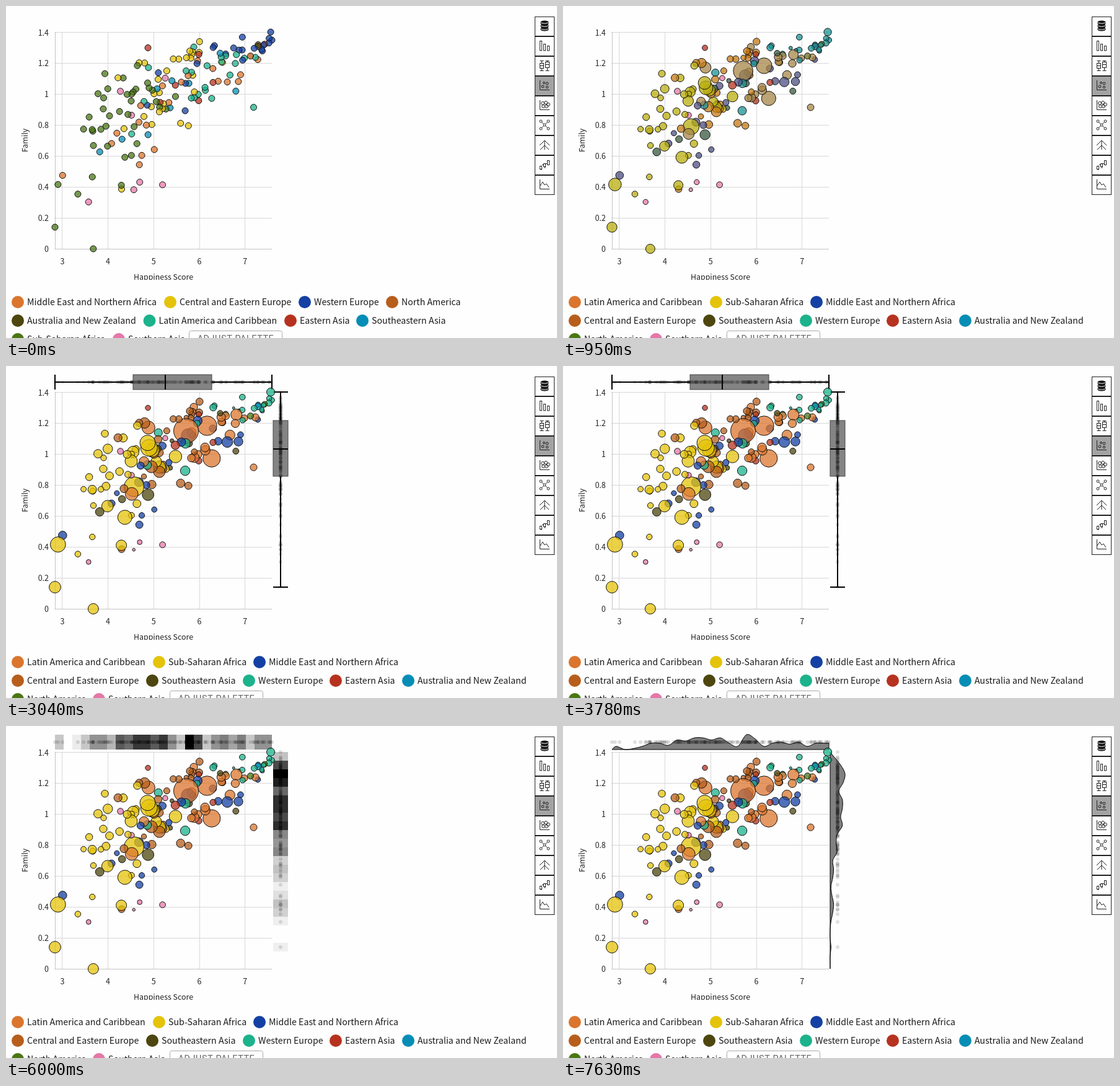
An HTML page with a canvas for the animation above (8000 ms loop, 889 by 536 pixels).

```html
<!DOCTYPE html>
<html lang="en">
<head>
<meta charset="utf-8">
<title>Scatter plot with marginal distributions</title>
<style>
html, body { margin: 0; width: 100%; height: 100%; overflow: hidden; background: #fefefe; }
canvas { display: block; }
</style>
</head>
<body>
<canvas id="stage" width="889" height="536"></canvas>
<script>
const g = document.getElementById('stage').getContext('2d');
const LOOP = 8000;
const SANS = '"Noto Sans CJK SC", "Noto Sans CJK JP", "Noto Sans CJK", "Noto Sans", sans-serif';
const PALETTE = [[219, 117, 46], [228, 195, 10], [20, 64, 164], [183, 94, 27], [77, 70, 14],
  [28, 178, 140], [182, 50, 31], [5, 141, 181], [74, 119, 20], [229, 120, 168]];

// Plot area and scales
const L = 79, R = 429, T = 42, B = 392;
const sx = v => L + (v - 2.839) / 4.748 * (R - L);
const sy = v => B - v / 1.40223 * (B - T);
const sr = v => 2 + (v - 18.5) / 118.4 * 18;

// Each region: palette index before and after, then score, family, error (x 1000)
const dots = [];
function region(from, to, d) {
  for (let i = 0; i < d.length; i += 3) {
    dots.push({ x: sx(d[i]), y: sy(d[i + 1]), r: sr(d[i + 2]), a: PALETTE[from], b: PALETTE[to] });
  }
}
// Western Europe
region(2, 5, [7.587, 1.35, 34.1, 7.561, 1.402, 48.8, 7.527, 1.361, 33.3, 7.522, 1.331, 38.8,
  7.406, 1.318, 31.4, 7.378, 1.28, 28, 7.364, 1.289, 31.6, 7.2, 1.297, 37.5, 6.946, 1.22, 35,
  6.94, 1.369, 36.8, 6.937, 1.286, 36, 6.867, 1.285, 18.7, 6.75, 1.299, 18.5, 6.575, 1.26, 35.1,
  6.329, 1.314, 34.7, 6.302, 1.302, 42.1, 5.948, 1.198, 39.1, 5.695, 1.07, 56.4,
  5.689, 0.893, 55.8, 5.102, 1.139, 48, 4.857, 0.929, 50.6]);
// North America
region(3, 8, [7.427, 1.323, 35.5, 7.119, 1.247, 38.4]);
// Australia and New Zealand
region(4, 7, [7.286, 1.32, 33.7, 7.284, 1.309, 40.8]);
// Southeastern Asia
region(7, 4, [6.798, 1.02, 37.8, 6.455, 1.265, 35.6, 5.77, 1.07, 43.3, 5.399, 1.087, 26,
  5.36, 0.912, 31.1, 5.073, 1.035, 49.3, 4.876, 0.738, 67, 4.307, 0.709, 43.5, 3.819, 0.627, 50.7]);
// Eastern Asia
region(6, 6, [6.298, 1.076, 38.7, 5.987, 1.257, 35.8, 5.984, 0.958, 41, 5.474, 1.058, 50.5,
  5.14, 0.947, 24.2, 4.874, 1.3, 33.1]);
// Southern Asia
region(9, 9, [5.253, 1.104, 32.3, 5.194, 0.414, 37.3, 4.694, 0.431, 30.8, 4.565, 0.382, 20.4,
  4.514, 0.864, 36.1, 4.271, 1.019, 37.5, 3.575, 0.303, 30.8]);
// Middle East and Northern Africa
region(0, 2, [7.278, 1.224, 34.7, 6.901, 1.126, 37.3, 6.853, 1.082, 53.4, 6.611, 1.079, 62.6,
  6.411, 1.084, 46.3, 6.295, 1.166, 44.6, 5.96, 1.216, 54.1, 5.754, 1.12, 78.3, 5.605, 1.078, 51,
  5.332, 0.946, 38.6, 5.192, 1.054, 45.2, 5.013, 0.642, 34.2, 4.839, 0.8, 43.4, 4.739, 0.604, 35.9,
  4.715, 0.926, 43.9, 4.686, 0.544, 44.5, 4.677, 0.819, 52.3, 4.194, 0.748, 32.6,
  4.077, 0.681, 43.7, 3.006, 0.475, 50.2]);
// Latin America and Caribbean
region(5, 0, [7.226, 1.238, 44.5, 7.187, 0.915, 41.8, 6.983, 1.233, 40.8, 6.81, 1.256, 64.8,
  6.786, 1.199, 49.1, 6.67, 1.124, 58, 6.574, 1.248, 46.1, 6.485, 1.209, 45.4, 6.477, 1.24, 50.5,
  6.269, 0.973, 98.1, 6.168, 1.184, 109, 6.13, 1.025, 56.2, 6.123, 1.044, 52.2, 5.975, 0.999, 45.3,
  5.89, 0.978, 56.4, 5.878, 1.305, 45.6, 5.828, 1.142, 53.7, 5.824, 0.975, 46.2,
  5.709, 1.151, 136.9, 4.885, 1.172, 74.5, 4.788, 0.953, 56.5, 4.518, 0.743, 73.3]);
// Central and Eastern Europe
region(1, 3, [6.505, 1.206, 41.7, 6.003, 1.34, 43.6, 5.995, 1.27, 42.7, 5.889, 1.015, 38,
  5.855, 1.122, 41.1, 5.848, 1.274, 42.5, 5.833, 1.257, 38.4, 5.813, 1.233, 39.4, 5.791, 1.279, 42.6,
  5.759, 0.796, 43.9, 5.716, 1.236, 31.4, 5.589, 0.812, 50.2, 5.548, 1.227, 41.8, 5.429, 1.228, 40.1,
  5.286, 1.151, 38.2, 5.212, 0.938, 33.6, 5.192, 0.906, 52.4, 5.124, 0.886, 66.1, 5.123, 1.01, 48.6,
  5.098, 1.096, 46.4, 5.007, 1.003, 53.8, 4.959, 0.804, 50.1, 4.949, 0.919, 69.1, 4.8, 1.202, 61.1,
  4.786, 0.856, 32, 4.681, 1.203, 44.1, 4.35, 0.777, 47.6, 4.297, 0.386, 42.2, 4.218, 1.106, 48.3]);
// Sub-Saharan Africa
region(8, 1, [5.477, 0.985, 72, 5.268, 0.904, 41.9, 5.129, 0.916, 69.9, 5.057, 0.952, 61.6,
  4.971, 1.026, 79, 4.898, 1.041, 94.4, 4.867, 1.073, 87.4, 4.642, 1.185, 45.9, 4.633, 0.68, 47.4,
  4.61, 1.033, 42.9, 4.571, 0.79, 110.7, 4.55, 1.014, 67.4, 4.517, 1.001, 36.8, 4.512, 0.604, 37.8,
  4.507, 0.956, 70.7, 4.436, 0.869, 39.5, 4.419, 0.999, 47.3, 4.369, 0.592, 81, 4.332, 1.105, 49.3,
  4.292, 0.411, 61.3, 4.252, 0.888, 46.8, 4.033, 0.86, 47.6, 3.995, 1.035, 56, 3.989, 0.664, 66.8,
  3.956, 0.793, 48, 3.931, 1.133, 43.2, 3.904, 0.976, 36.1, 3.896, 0.905, 45.5, 3.845, 0.773, 36,
  3.781, 1.003, 50.6, 3.681, 0.668, 36.3, 3.678, 0, 61.1, 3.667, 0.761, 38.3, 3.656, 0.465, 35.9,
  3.655, 0.771, 51.4, 3.587, 0.852, 43.2, 3.465, 0.774, 34.6, 3.34, 0.354, 36.6,
  2.905, 0.416, 86.6, 2.839, 0.14, 67.3]);
dots.sort((p, q) => q.x - p.x);

// Positions along each margin, and their counts in 25 bins of 14 px
const BIN = 14;
function margin(values, start) {
  const count = new Array(25).fill(0);
  for (const v of values) count[Math.min(24, Math.floor((v - start) / BIN))]++;
  const max = Math.max(...count);
  return { values, start, share: count.map(c => c / max) };
}
const top_ = margin(dots.map(d => d.x), L);
const side = margin(dots.filter(d => d.y < B - 1).map(d => d.y), T);

const rgb = (c, a = 1) => `rgba(${c.map(Math.round)},${a})`;
const clamp = v => Math.max(0, Math.min(1, v));
const ease = t => t < .5 ? 4 * t ** 3 : 1 - (2 - 2 * t) ** 3 / 2;

function line(...p) {
  g.beginPath();
  for (let i = 0; i < p.length; i += 2) g.lineTo(p[i], p[i + 1]);
  g.stroke();
}
function disc(x, y, r, fill, stroke) {
  g.beginPath();
  g.arc(x, y, r, 0, 7);
  if (fill) { g.fillStyle = fill; g.fill(); }
  if (stroke) { g.strokeStyle = stroke; g.stroke(); }
}
function text(s, x, y, size, align = 'left', color = '#222') {
  g.font = `${size}px ${SANS}`;
  g.textAlign = align;
  g.fillStyle = color;
  g.fillText(s, x, y);
}

function axes() {
  g.lineWidth = 1;
  g.strokeStyle = '#d8d8d8';
  for (let i = 0; i < 8; i++) {
    const y = sy(i * .2), row = Math.floor(y) + .5;
    line(L - 1, row, R, row);
    text(String(+(i * .2).toFixed(1)), 69, y + 5, 12.5, 'right');
  }
  for (let v = 3; v < 8; v++) {
    const x = sx(v), col = Math.floor(x) + .5;
    line(col, T, col, B);
    text(String(v), x, 417, 12.5, 'center');
  }
  g.strokeStyle = '#c4c4c4';
  line(L + .5, T, L + .5, B);
  line(L, B + .5, R, B + .5);
  g.save();
  g.beginPath();
  g.rect(0, 0, 460, 442);
  g.clip();
  text('Happiness Score', 254, 442, 12.4, 'center');
  g.translate(35, 217);
  g.rotate(-Math.PI / 2);
  text('Family', 0, 0, 12.4, 'center');
  g.restore();
}

function scatter(k) {
  g.lineWidth = 1;
  for (const d of dots) {
    const c = d.a.map((v, i) => v + (d.b[i] - v) * k);
    disc(d.x, d.y, 5 + (d.r - 5) * k, rgb(c, .75), '#111');
  }
}

const before = [
  [[19, 'Middle East and Northern Africa'], [265, 'Central and Eastern Europe'], [482, 'Western Europe'], [623, 'North America']],
  [[19, 'Australia and New Zealand'], [231.5, 'Latin America and Caribbean'], [459, 'Eastern Asia'], [575, 'Southeastern Asia']],
  [[19, 'Sub-Saharan Africa'], [182, 'Southern Asia']]];
const after = [
  [[19, 'Latin America and Caribbean'], [247, 'Sub-Saharan Africa'], [409, 'Middle East and Northern Africa']],
  [[19, 'Central and Eastern Europe'], [236, 'Southeastern Asia'], [392, 'Western Europe'], [532, 'Eastern Asia'], [649, 'Australia and New Zealand']],
  [[19, 'North America'], [150, 'Southern Asia']]];

function legend(rows, button) {
  let n = 0;
  rows.forEach((row, i) => {
    const y = 478 + i * 30;
    for (const [x, name] of row) {
      disc(x, y, 10, rgb(PALETTE[n++]));
      text(name, x + 15, y + 5, 14.2, 'left', '#1a1a1a');
    }
  });
  g.beginPath();
  g.roundRect(button + .5, 524.5, 150, 30, 3);
  g.fillStyle = '#fff';
  g.fill();
  g.strokeStyle = '#aaa';
  g.stroke();
  g.font = '14.5px Roboto, sans-serif';
  g.letterSpacing = '0.5px';
  g.textAlign = 'center';
  g.fillStyle = '#666';
  g.fillText('ADJUST PALETTE', button + 75.5, 542);
  g.letterSpacing = '0px';
}

const icons = [
  () => {
    for (const y of [37, 32, 27]) {
      g.beginPath();
      g.ellipse(869, y + 1, 6.5, 2.6, 0, 0, 7);
      g.fillStyle = '#111';
      g.fill();
      g.fillRect(862.5, y - 1, 13, 2);
      g.beginPath();
      g.ellipse(869, y - 1, 6.5, 2.4, 0, 0, 7);
      g.fill();
      g.strokeStyle = '#fff';
      g.beginPath();
      g.ellipse(869, y - 1.2, 6.5, 2.4, 0, .1, 3.04);
      g.stroke();
    }
  },
  () => [[861.5, 56.5], [867.5, 61.5], [873.5, 64.5]].forEach(([x, y]) => g.strokeRect(x, y, 3, 72 - y)),
  () => [[864.5, 92.5, 8], [873.5, 90.5, 9]].forEach(([x, y, h]) => {
    line(x - 3, 88.5, x + 3, 88.5); line(x, 88, x, y); g.strokeRect(x - 3, y, 6, h);
    line(x - 3, y + 4, x + 3, y + 4); line(x, y + h, x, 104); line(x - 3, 104.5, x + 3, 104.5);
  }),
  () => {
    line(861.5, 120, 861.5, 135.5, 877, 135.5);
    for (const [x, y, r] of [[866, 130, 2], [868, 124, 1.5], [873, 125, 2], [873, 131, 1.7]]) disc(x, y, r, null, '#222');
  },
  () => {
    line(861.5, 152, 861.5, 167.5, 877, 167.5);
    for (const [x, y] of [[866, 157], [871, 156], [875, 159], [867, 162], [872, 162]]) disc(x, y, 2.5, null, '#222');
  },
  () => {
    for (const [x, y] of [[863, 186], [875, 186], [863, 198], [875, 198]]) {
      line(869, 192, x, y);
      disc(x, y, 2, '#fff', '#222');
    }
    disc(869, 192, 2, '#fff', '#222');
  },
  () => {
    line(861, 225, 869, 217, 877, 225);
    line(869, 217, 869, 232);
    line(862, 232, 869, 225, 876, 232);
  },
  () => {
    [[861.5, 258.5, 5], [867.5, 254.5, 5], [873.5, 249.5, 7]].forEach(([x, y, h]) => g.strokeRect(x, y, 3, h));
    line(863.5, 263, 863.5, 265); line(865, 256.5, 867, 256.5); line(871, 254.5, 873, 254.5); line(869.5, 259, 869.5, 262);
  },
  () => {
    line(861.5, 280, 861.5, 295.5, 877, 295.5);
    line(862, 290, 866, 284, 869, 289, 872, 287, 876, 293);
  }
];
function toolbar() {
  icons.forEach((icon, i) => {
    const y = 17 + i * 32;
    g.fillStyle = i === 3 ? '#a3a3a3' : '#fff';
    g.fillRect(853, y, 32, 32);
    g.strokeStyle = '#222';
    g.lineWidth = 1;
    g.strokeRect(853.5, y + .5, 31, 31);
    icon();
  });
}

// Margins are drawn in (u, v): u along the axis, v from 0 at the plot to 24 outwards
function boxplot(m, at, lo, q1, mid, q3, hi) {
  g.strokeStyle = '#000';
  g.lineWidth = 2;
  line(...at(lo, 12), ...at(hi, 12));
  line(...at(lo, 0), ...at(lo, 24));
  line(...at(hi, 0), ...at(hi, 24));
  const [x, y] = at(q1, 0), [x2, y2] = at(q3, 24);
  g.fillStyle = 'rgba(128,128,128,.97)';
  g.fillRect(x, y, x2 - x, y2 - y);
  g.lineWidth = 1;
  g.strokeStyle = '#444';
  g.strokeRect(x, y, x2 - x, y2 - y);
  g.lineWidth = 2;
  g.strokeStyle = '#000';
  line(...at(mid, 0), ...at(mid, 24));
}

function curve(p, at) {
  for (let i = 0; i < p.length - 1; i++) {
    const a = p[Math.max(0, i - 1)], b = p[i], c = p[i + 1], d = p[Math.min(p.length - 1, i + 2)];
    g.bezierCurveTo(...at(b[0] + (c[0] - a[0]) / 6, b[1] + (c[1] - a[1]) / 6),
      ...at(c[0] - (d[0] - b[0]) / 6, c[1] - (d[1] - b[1]) / 6), ...at(...c));
  }
}
function outline(m) {
  const p = m.share.map((s, i) => [m.start + (i + .5) * BIN, s]);
  return [[m.start, m.share[0]], ...p, [m.start + 350, m.share[24]]];
}
function paint() {
  g.closePath();
  g.fillStyle = '#808080';
  g.fill();
  g.strokeStyle = '#000';
  g.lineWidth = 1;
  g.stroke();
}
function violin(m, at) {
  let p = outline(m);
  if (m === side) p = p.slice(0, -2);
  const up = p.map(([u, s]) => [u, 12 + s * 12]);
  const down = p.map(([u, s]) => [u, 12 - s * 12]).reverse();
  g.beginPath();
  g.moveTo(...at(...up[0]));
  curve(up, at);
  g.lineTo(...at(...down[0]));
  curve(down, at);
  paint();
}
function heat(m, at) {
  m.share.forEach((s, i) => {
    const u = m.start + i * BIN, [x, y] = at(u, 0), [x2, y2] = at(u + BIN, 24);
    g.fillStyle = `rgba(0,0,0,${s})`;
    g.fillRect(x, y, x2 - x, y2 - y);
  });
}
function area(m, at) {
  const p = outline(m).map(([u, s]) => [u, s * 24]);
  p[0][1] = p[p.length - 1][1] = 0;
  if (m === top_) p[p.length - 1][1] = m.share[24] * 24;
  g.beginPath();
  g.moveTo(...at(m.start, 0));
  curve(p, at);
  g.lineTo(...at(m.start + 350, 0));
  paint();
}

const atTop = (u, v) => [u, 38 - v];
const atSide = (u, v) => [431 + v, u];
function margins(t) {
  if (t < 3040) return;
  if (t < 4520) {
    boxplot(top_, atTop, 79, 205, 257, 332, 429);
    boxplot(side, atSide, 42, 88, 134, 178, 357);
  } else {
    const draw = t < 6000 ? violin : t < 7190 ? heat : area;
    draw(top_, atTop);
    draw(side, atSide);
  }
  for (const [m, at] of [[top_, atTop], [side, atSide]]) {
    for (const u of m.values) disc(...at(u, 12), 3, 'rgba(0,0,0,.12)');
  }
}

function frame() {
  const t = performance.now() % LOOP;
  const step = t < 500 ? 0 : 500 + Math.floor((t - 500) / 150) * 150;
  g.fillStyle = '#fefefe';
  g.fillRect(0, 0, 889, 536);
  g.lineWidth = 1;
  axes();
  margins(t);
  scatter(ease(clamp((step - 362) / 1000)));
  if (t < 500) legend(before, 295);
  else legend(after, 264);
  toolbar();
  requestAnimationFrame(frame);
}
frame();
</script>
</body>
</html>
```
